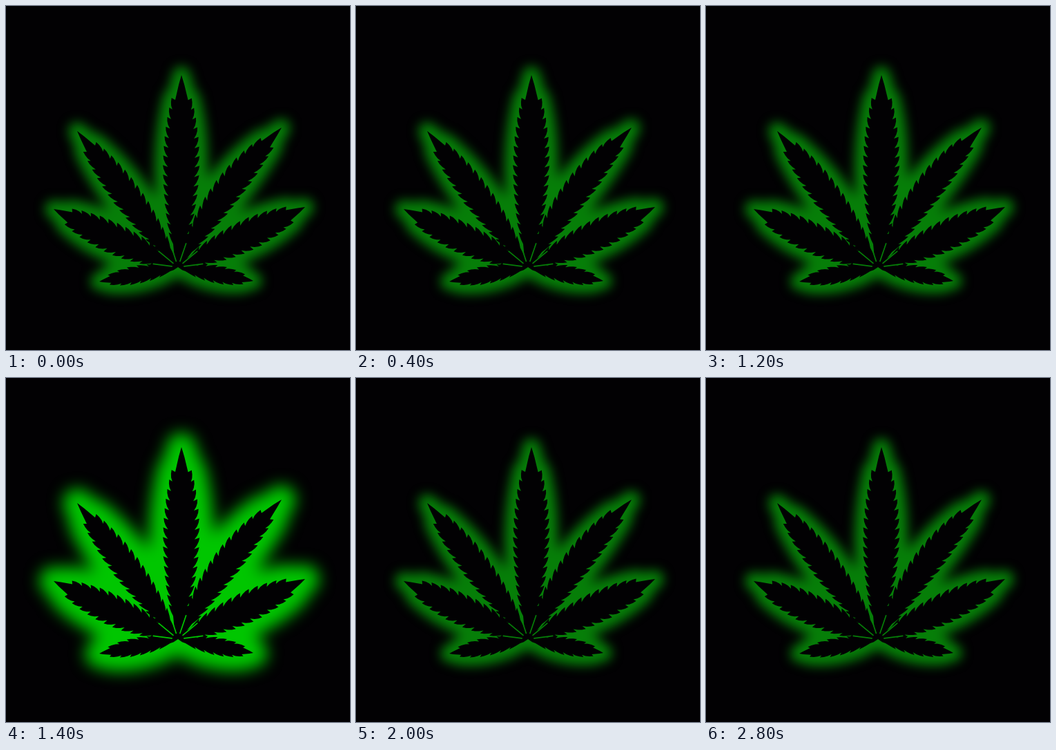
An HTML page for the animation above (3 s loop, 498 px wide and 498 px high).

```html
<!DOCTYPE html>
<html>
<head>
<meta charset="utf-8">
<style>
  html, body { margin: 0; height: 100%; overflow: hidden; background: #020103; }
  svg { display: block; width: 100vw; height: 100vh; color: #067e08; }
  svg.lit { color: #00c600; }
  .glow { fill: currentColor; stroke: currentColor; stroke-linejoin: round; }
  #dim { stroke-width: 25; }
  #bright { stroke-width: 41; display: none; }
  .lit #dim { display: none; }
  .lit #bright { display: inline; }
  #leaf { fill: #020103; }
  #veins { fill: none; stroke: currentColor; stroke-width: 1.7; stroke-linecap: round; }
</style>
</head>
<body>
<svg id="stage" viewBox="0 0 498 498">
  <defs>
    <filter id="soft" filterUnits="userSpaceOnUse" x="0" y="0" width="498" height="498" color-interpolation-filters="sRGB">
      <feGaussianBlur stdDeviation="8"/>
    </filter>
    <filter id="wide" filterUnits="userSpaceOnUse" x="0" y="0" width="498" height="498" color-interpolation-filters="sRGB">
      <feGaussianBlur stdDeviation="11"/>
    </filter>
  </defs>
  <path id="dim" class="glow" filter="url(#soft)"/>
  <path id="bright" class="glow" filter="url(#wide)"/>
  <path id="leaf"/>
  <path id="veins"/>
</svg>
<script>
const byId = id => document.getElementById(id);
const hub = { x: 249, y: 378 };

// Leaflet tips from left to right; bow bends the axis sideways
const leaflets = [
  { x: 135, y: 399, bow: 0 },
  { x: 69, y: 294, bow: -2 },
  { x: 103, y: 181, bow: 2 },
  { x: 254, y: 100, bow: 2 },
  { x: 399, y: 176, bow: -9 },
  { x: 433, y: 291, bow: 1 },
  { x: 358, y: 398, bow: 0 }
];
const widthFromCenter = [26, 21, 22.5, 13];

const join = points => points.map(p => p.map(v => v.toFixed(1)).join(" ")).join("L");

function leafletPath(tip, index) {
  const halfWidth = widthFromCenter[Math.abs(index - 3)];
  const dx = hub.x - tip.x, dy = hub.y - tip.y, length = Math.hypot(dx, dy);
  const width = t => halfWidth * Math.sin(Math.PI * Math.min(1, t) ** 0.9) ** 0.75;
  const first = 0.12, last = 0.87;
  const teeth = Math.round((last - first) * length / 14);
  const step = (last - first) / teeth;

  function edge(side) {
    const points = [];
    const add = (t, scale) => {
      const offset = tip.bow * 4 * t * (1 - t) + side * width(t) * scale;
      points.push([
        tip.x + dx * t + dy / length * offset,
        tip.y + dy * t - dx / length * offset
      ]);
    };
    add(0, 0);
    add(0.05, 0.5);
    add(first + 0.2 * step, 0.62);
    for (let i = 0; i < teeth; i++) {
      const t = first + i * step;
      add(t, 1.02);
      add(t + 0.4 * step, 0.98);
      add(t + 0.8 * step, 0.89);
      add(t + 1.2 * step, 0.74);
    }
    add(0.94, 0.9);
    add(1, 0);
    return points;
  }
  return "M" + join([...edge(1), ...edge(-1).reverse()]) + "Z";
}

// A thin gap runs from the hub between each pair of neighbours
function veinPath(tip, index) {
  const next = leaflets[index + 1];
  const angleTo = p => Math.atan2(p.y - hub.y, p.x - hub.x);
  const wrap = a => a > Math.PI / 2 ? a - 2 * Math.PI : a;
  const angle = (wrap(angleTo(tip)) + wrap(angleTo(next))) / 2;
  const at = r => [hub.x + r * Math.cos(angle), hub.y + r * Math.sin(angle)];
  return "M" + join([at(9), at(36)]);
}

const outline = leaflets.map(leafletPath).join("");
for (const id of ["dim", "bright", "leaf"]) byId(id).setAttribute("d", outline);
byId("veins").setAttribute("d", leaflets.slice(0, -1).map(veinPath).join(""));

// One digit per 200 ms beat: 1 is the strong glow
const rhythm = "010011010100110";

function draw() {
  const beat = Math.floor(performance.now() / 200) % rhythm.length;
  byId("stage").classList.toggle("lit", rhythm[beat] === "1");
  requestAnimationFrame(draw);
}
draw();
</script>
</body>
</html>
```
